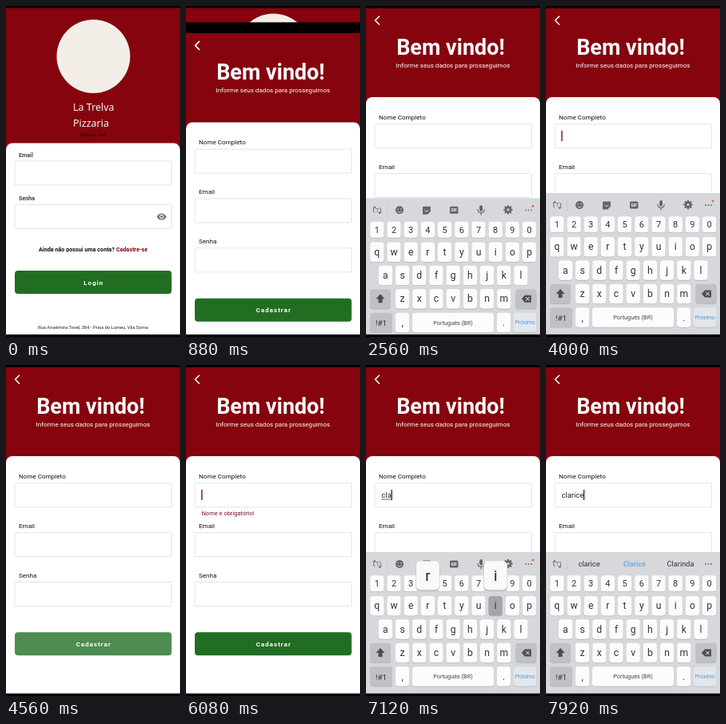
Recreate the animation shown at these times as an HTML page. Size 218 by 414 pixels, loop 8 s.

```html
<!DOCTYPE html>
<html lang="pt-BR">
<head>
<meta charset="utf-8">
<style>
  html, body { margin: 0; width: 100%; height: 100%; overflow: hidden; background: #000; }
  svg { display: block; width: 218px; height: 414px; font-family: Roboto, "Noto Sans", sans-serif; }
  text { white-space: pre; }
</style>
</head>
<body>
<svg id="stage" viewBox="0 0 218 414"></svg>
<script>
const RED = '#86040e', GREEN = '#216e23', GREY = '#63656a';
const stage = document.getElementById('stage');

// ---- markup helpers ----
const rect = (x, y, w, h, fill, r = 0, more = '') =>
  `<rect x="${x}" y="${y}" width="${w}" height="${h}" rx="${r}" fill="${fill}" ${more}/>`;
const text = (s, x, y, size, fill = '#111', more = '') =>
  `<text x="${x}" y="${y}" font-size="${size}" fill="${fill}" ${more}>${s}</text>`;
const mid = (s, x, y, size, fill, more = '') => text(s, x, y, size, fill, 'text-anchor="middle" ' + more);
const line = (d, color, w) =>
  `<path d="${d}" fill="none" stroke="${color}" stroke-width="${w}" stroke-linecap="round" stroke-linejoin="round"/>`;
const dot = (x, y, r, fill) => `<circle cx="${x}" cy="${y}" r="${r}" fill="${fill}"/>`;
const bold = 'font-weight="700"';
const field = y => rect(11, y, 196.5, 30, '#fff', 1, 'stroke="#e4e4e4" stroke-width="1"');
const button = (label, y) => rect(11, y, 196.5, 29, GREEN, 4) +
  mid(label, 109.8, y + 17.6, 8, '#fff', bold + ' letter-spacing="1"');
const panel = y => rect(0, y, 218, 430 - y, '#fff', 8);

// ---- screens ----
const login = rect(0, 0, 218, 430, RED) + dot(109.5, 63, 46, '#f3efe8') +
  ['La Trelva', 'Pizzaria'].map((s, i) =>
    text(s, 84, 130.5 + 20 * i, 12.6, '#fff', 'font-family="Open Sans, sans-serif"')).join('') +
  mid('Delivery App', 109, 163, 6, '#2a0004') + panel(171.5) +
  text('Email', 16, 188.5, 7.2, '#444', bold) + field(194) +
  text('Senha', 16, 242.7, 7.2, '#444', bold) + field(248.5) +
  `<path transform="translate(188.5 257) scale(.54)" fill="#6b6b6b" fill-rule="evenodd"
    d="M12 4.5C7 4.5 2.7 7.6 1 12c1.700 4.400 6 7.500 11 7.500s9.300-3.100 11-7.500c-1.700-4.400-6-7.500-11-7.500z
    M12 17a5 5 0 1 1 0-10 5 5 0 0 1 0 10z M12 9a3 3 0 1 0 0 6 3 3 0 0 0 0-6z"/>` +
  text('Ainda não possui uma conta?', 41, 307.3, 7.2, '#111', bold) +
  `<g id="link">${text('Cadastre-se', 138, 307.3, 7.2, RED, bold)}</g>` +
  button('Login', 331) +
  mid('Rua Anselmira Tovel, 384 - Praia do Lumeu, Vila Sorna', 109, 404.2, 5.8, '#222');

const signup = rect(0, -11, 218, 441, '#000') + rect(0, 2.5, 218, 430, RED) +
  line('M16.500 13 L11.500 18 L16.500 23', '#fff', 1.6) +
  mid('Bem vindo!', 106, 61, 27, '#fff', bold) +
  mid('Informe seus dados para prosseguimos', 109, 77, 8.1, '#fff') + panel(114) +
  ['Nome Completo', 'Email', 'Senha'].map((s, i) =>
    text(s, 16, 142 + 61.8 * i, 8.1) + field(147.8 + 61.8 * i)).join('') +
  `<g id="error">${text('Nome é obrigatório!', 19.5, 187.6, 7.5, '#8a0a20')}</g>` +
  text('', 19.5, 166, 9.4, '#222', 'id="typed"') +
  `<path id="under" stroke="#333" stroke-width=".8"/>` +
  rect(19, 156, 1.4, 13, '#8a0a20', 0, 'id="caret"') +
  `<g id="send">${button('Cadastrar', 334.3)}</g>`;

// ---- keyboard ----
const keyPos = {};
const cap = (x, y, w, h = 24.5, fill = '#fcfcfd', id = '') =>
  rect(x, y + .8, w, h, '#b4b6bb', 3.5) + rect(x, y, w, h, fill, 3.5, id);
const row = (chars, x0, y, h) => [...chars].map((c, i) => {
  const x = x0 + 21.2 * i;
  keyPos[c] = [x, y];
  return cap(x - 8.6, y - h / 2, 17.2, h, '#fcfcfd', `id="key${c}"`) +
    mid(c, x, y + 4, h < 22 ? 11 : 12.2, '#333');
}).join('');

const rotate = Array.from({length: 8}, (_, i) =>
  `<rect x="177" y="242.800" width="2" height="3" fill="${GREY}" transform="rotate(${i * 45} 178 248.500)"/>`).join('');
const icons = dot(42, 249, 5, GREY) + dot(40.2, 247.6, .8, '#d7d8dc') + dot(43.8, 247.6, .8, '#d7d8dc') +
  line('M39.500 250.500 Q42 253.500 44.500 250.500', '#d7d8dc', 1) +
  `<path d="M72 244.500h8a1 1 0 0 1 1 1v5l-4 4h-5a1 1 0 0 1-1-1v-8a1 1 0 0 1 1-1z" fill="${GREY}"/>` +
  line('M73.500 249.500 Q75.500 252 78 249.500', '#d7d8dc', 1) +
  rect(105, 244.5, 10.5, 9, GREY, 1.5) + mid('GIF', 110.2, 250.8, 4.8, '#fff', bold) +
  rect(142.2, 243, 3.8, 7.5, GREY, 1.9) +
  line('M140 248 Q140 252.300 144.100 252.300 Q148.200 252.300 148.200 248 M144.100 252.300V255', GREY, 1.1) +
  rotate + dot(178, 248.5, 4.3, GREY) + dot(178, 248.5, 1.6, '#d7d8dc') + dot(209, 244, 1.5, '#f0702a');
const words = mid('clarice', 54, 252, 9.2, '#333') + mid('Clarice', 111, 252, 9.2, '#4f9bdb') +
  rect(96.5, 248.6, 29, .8, '#8fbfe6') + mid('Clarinda', 168.5, 252, 9.2, '#333');

const keyboard = rect(0, 234, 218, 180, '#d7d8dc') +
  line('M10.500 252 A5 5 0 0 1 11 245 M17.500 246 A5 5 0 0 1 17 253 M9 246l2-1.500 1 2 M19 252l-2 1.500-1-2', GREY, 1) +
  mid('T', 14.1, 251.4, 6.5, GREY) + rect(26, 242, .6, 14, '#c3c5ca') +
  [200, 203.5, 207].map(x => dot(x, 249, .9, GREY)).join('') +
  `<g id="icons">${icons}</g><g id="words">${words}</g>` +
  row('1234567890', 13.8, 273.3, 20) + row('qwertyuiop', 13.8, 301.3, 24.5) +
  row('asdfghjkl', 24.4, 330.6, 24.5) + row('zxcvbnm', 45.6, 360, 24.5) +
  cap(5, 347.8, 26, 24.5, '#bfc1c7') + cap(187.5, 347.8, 26, 24.5, '#bfc1c7') +
  `<path d="M18 354l5.500 6h-3v5h-5v-5h-3z" fill="#4a4c50"/>` +
  `<path d="M195 360l4-4.500h8v9h-8z" fill="#4a4c50"/>` + line('M200.500 358l4 4m0-4l-4 4', '#fff', 1) +
  cap(5, 377.3, 28, 24.5, '#bfc1c7') + mid('!#1', 19, 393.5, 9.8, '#333') +
  cap(37, 377.3, 17.2) + mid(',', 45.6, 393.5, 12, '#333') +
  cap(58, 377.3, 102) + mid('Português (BR)', 109, 392.3, 7.3, '#444') +
  cap(164, 377.3, 17.2) + mid('.', 172.6, 393.5, 12, '#333') +
  cap(185, 377.3, 28.5, 24.5, '#e3e7ec') + mid('Próximo', 199.3, 392, 6.8, '#4f9bdb') +
  '<g id="pops"></g>';

stage.innerHTML = `<g id="login">${login}</g><g id="signup">${signup}</g><g id="keyboard">${keyboard}</g>` +
  rect(0, 0, 218, 2.5, '#000') + rect(0, 410.8, 218, 4, '#000');

// ---- motion ----
const el = id => document.getElementById(id);
const clamp = v => Math.max(0, Math.min(1, v));
const part = (t, from, dur) => clamp((t - from) / dur);
const moveY = (id, y) => el(id).setAttribute('transform', `translate(0 ${y})`);
const fade = (id, v) => el(id).setAttribute('opacity', v);
const dip = (t, from, dur, depth) => 1 - depth * Math.sin(Math.PI * part(t, from, dur));

const name = 'clarice';
const presses = [6720, 6820, 6920, 7020, 7100, 7280, 7400];

function keyboardY(t) {
  if (t < 2400 || (t >= 4410 && t < 6160)) return 180;
  if (t >= 4120 && t < 4410) return 180 * part(t, 4120, 290) ** 2;
  return 180 * (1 - part(t, t < 4120 ? 2400 : 6160, 400)) ** 6.5;
}

function render(t) {
  const rest = (1 - part(t, 600, 560)) ** 3.74;
  moveY('login', -8 * (1 - rest));
  moveY('signup', 425 * rest);
  moveY('keyboard', keyboardY(t));
  fade('link', dip(t, 60, 440, .7));
  fade('send', dip(t, 4520, 300, .5));
  fade('error', +(t >= 4720 && t < 6520));

  const typed = el('typed');
  typed.textContent = name.slice(0, presses.filter(p => t >= p + 110).length);
  const end = 19.5 + (typed.textContent ? typed.getComputedTextLength() : 0);
  const blink = t >= 1984 && Math.floor((t - 1984) / 504) % 2 === 0;
  el('caret').setAttribute('x', end - .3);
  fade('caret', +(t >= 6160 || blink));
  el('under').setAttribute('d', t < 7900 && end > 20 ? `M19.5 168H${end}` : '');

  const swap = part(t, 7640, 120);
  fade('icons', 1 - swap);
  fade('words', swap);

  let pops = '';
  for (const c of name) el('key' + c).setAttribute('fill', '#fcfcfd');
  presses.forEach((p, i) => {
    const c = name[i], [x, y] = keyPos[c];
    if (t < p || t >= p + 130) return;
    if (t < p + 70) el('key' + c).setAttribute('fill', '#a3a5aa');
    pops += rect(x - 15, y - 55.5, 30, 37, '#b9bbc0', 5.5) + rect(x - 14.5, y - 56, 29, 36, '#f9f9fa', 5) +
      mid(c, x, y - 31.5, 19, '#222');
  });
  el('pops').innerHTML = pops;
}

function tick() {
  render(performance.now() % 8000);
  requestAnimationFrame(tick);
}
tick();
</script>
</body>
</html>
```
